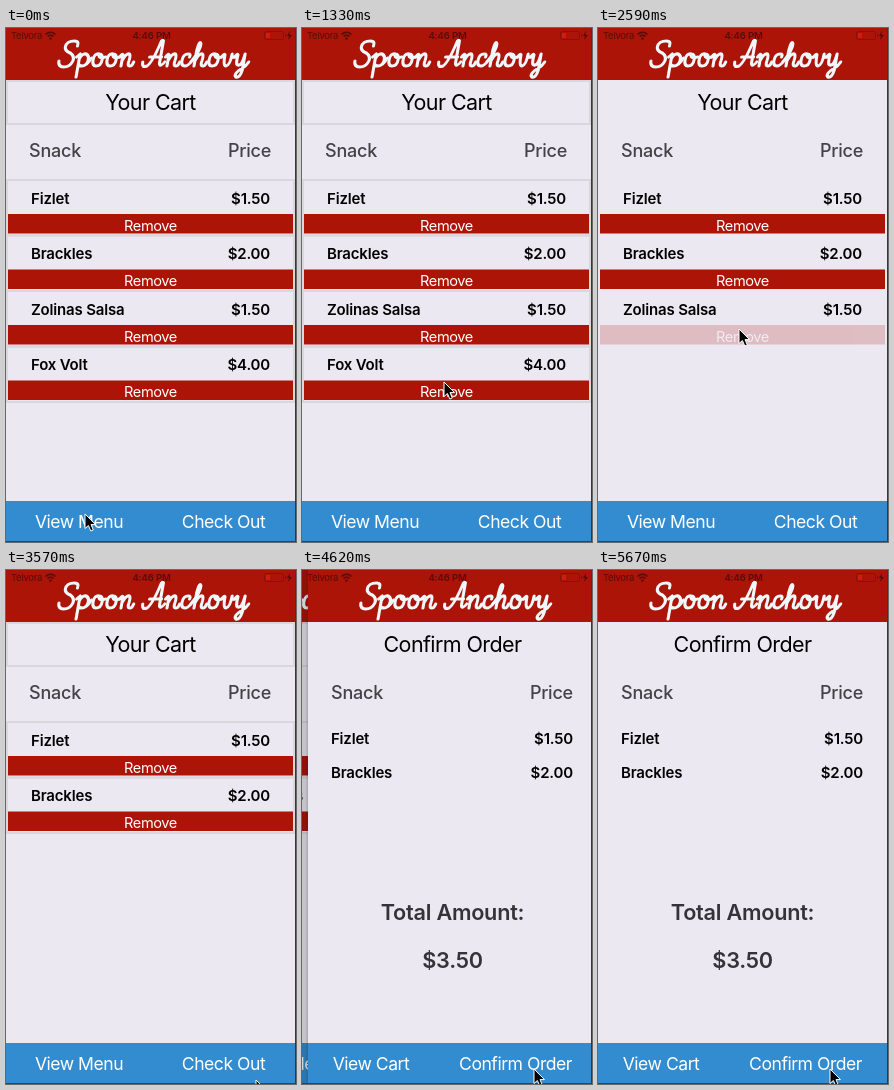
An HTML page for the animation above (5740 ms loop, 290 px wide and 514 px high).

```html
<!DOCTYPE html>
<html lang="en">
<head>
<meta charset="utf-8">
<title>Cart checkout</title>
<style>
  html, body { margin: 0; width: 100%; height: 100%; overflow: hidden; background: #ebe8f1; }
  svg { display: block; width: 290px; height: 514px; }
  text { font-family: Inter, "Open Sans", sans-serif; letter-spacing: -.028em; white-space: pre; }
  .semi { font-weight: 600; letter-spacing: -.012em; }
  .medium { font-weight: 500; letter-spacing: -.012em; }
  .line { fill: none; stroke: #d9d7dc; stroke-width: 2; }
  .script { fill: none; stroke: #f1f8fc; stroke-width: 3.1; stroke-linecap: round; stroke-linejoin: round; }
</style>
</head>
<body>
<svg id="stage" viewBox="0 0 290 514"></svg>
<script>
const LOOP = 5740, STEP = 70, WIDTH = 289;
const RED = '#ab1407', BLUE = '#338ccf', PAPER = '#ebe8f1';
const items = [['Fizlet', '$1.50'], ['Brackles', '$2.00'], ['Zolinas Salsa', '$1.50'], ['Fox Volt', '$4.00']];

// Brush lettering: advance width and pen path on a zero baseline
const glyphs = {
  S: [17, 'M16-20Q17-25 12-25Q4-25 4-19Q4-15 10-13Q15-10 14-5Q12 1 6 1Q0 1 0-5'],
  A: [21, 'M-1-4Q-1 2 4 0Q9-4 14-25Q15-26 16-25V-3Q17 2 21-4M5-9H17'],
  p: [15, 'M0-9L3-12V11M3-7Q5-13 9-12Q13-10 12-5Q11 0 7 0Q4 0 3-2M7 0Q12 0 15-8'],
  o: [14, 'M7-12Q2-13 2-6Q2 0 6 0Q11 0 11-6Q11-12 7-12Q7-7 14-9'],
  n: [15, 'M0-9Q2-13 3-11V0M3-5Q6-13 9-12Q11-11 10-5Q9 0 12 0Q14 0 15-4'],
  c: [12, 'M9-9Q10-12 7-12Q2-12 2-5Q2 0 6 0Q9 0 12-5'],
  h: [15, 'M-1-4Q7-16 6-22Q4-27 3-15V0M3-5Q6-13 9-12Q11-11 10-5Q9 0 12 0Q14 0 15-4'],
  v: [13, 'M0-9Q2-13 3-11Q3 0 6 0Q10-1 10-12Q10-8 13-9'],
  y: [14, 'M0-9Q2-13 3-11Q2-1 5-1Q9 0 10-12V4Q9 12 5 11Q1 8 10 2Q13 0 15-4'],
  ' ': [10, '']
};

const rect = (x, y, w, h, fill, extra = '') =>
  `<rect x="${x}" y="${y}" width="${w}" height="${h}" fill="${fill}" ${extra}/>`;
const box = (y, h) => `<rect class="line" x="1" y="${y + 1}" width="287" height="${h}"/>`;
const text = (x, y, str, size, anchor = 'start', fill = '#000', cls = '') =>
  `<text x="${x}" y="${y}" font-size="${size}" text-anchor="${anchor}" fill="${fill}" class="${cls}">${str}</text>`;

function lettering(str, x, y) {
  let pen = 0;
  const strokes = [...str].map(ch => {
    const [advance, d] = glyphs[ch];
    const path = `<path d="${d}" transform="translate(${pen})"/>`;
    pen += advance;
    return path;
  }).join('');
  return `<g class="script" role="img" aria-label="${str}" transform="translate(${x} ${y}) skewX(-10)">${strokes}</g>`;
}

function screen(title, left, leftX, right, rightX, body) {
  return rect(0, 0, WIDTH, 514, PAPER) +
    `<g class="borders">${box(52, 43)}</g>` +
    rect(0, 0, WIDTH, 52, RED) + lettering('Spoon Anchovy', 52, 38) +
    text(144.5, 82, title, 21.5, 'middle') +
    text(23, 128.5, 'Snack', 18, 'start', '#434246', 'medium') +
    text(265, 128.5, 'Price', 18, 'end', '#434246', 'medium') + body +
    rect(0, 473, WIDTH, 41, BLUE) +
    text(leftX, 499.5, left, 17.6, 'middle', '#fff') +
    text(rightX, 499.5, right, 17.6, 'middle', '#fff');
}

const row = ([name, price], i) => `<g class="row" transform="translate(0 ${151 + i * 55.5})">
  <g class="borders">${box(0, 55.5)}</g>
  ${text(25, 24.5, name, 15, 'start', '#000', 'semi')}${text(264, 24.5, price, 15, 'end', '#000', 'semi')}
  <g class="remove">${rect(2, 35, 285, 19.5, RED)}${text(144.5, 51.5, 'Remove', 14.6, 'middle', '#fff')}</g></g>`;

const cartBody = items.map(row).join('');
const orderBody = items.slice(0, 2).map(([name, price], i) =>
  text(23, 174 + i * 33.5, name, 15, 'start', '#000', 'semi') +
  text(265, 174 + i * 33.5, price, 15, 'end', '#000', 'semi')).join('') +
  text(144.5, 350, 'Total Amount:', 21.7, 'middle', '#343338', 'semi') +
  text(144.5, 398, '$3.50', 21.7, 'middle', '#343338', 'semi');

const statusBar = text(5, 11, 'Telvora', 9.5, 'start', '#560d08') +
  `<g fill="none" stroke="#560d08" stroke-width="1.6"><path d="M39.5 6.5Q44.500 2 49.500 6.500M41.500 8.500Q44.500 6 47.500 8.500"/>
   <circle cx="44.500" cy="10.500" r=".5"/></g>` +
  text(145.5, 11, '4:46 PM', 9.5, 'middle', '#560d08', 'semi') +
  `<rect x="258.500" y="3.500" width="19" height="8" rx="2" fill="none" stroke="#7c160f"/>` +
  rect(260, 5, 4, 5, '#d8190d') + rect(279, 6, 1.2, 3, '#7c160f') +
  `<path d="M284 3L281 8H283L282 12L286 7H283.500Z" fill="#560d08"/>`;

const stage = document.getElementById('stage');
stage.innerHTML = `
  <g id="cart">${screen('Your Cart', 'View Menu', 73, 'Check Out', 217.5, cartBody)}</g>
  ${rect(0, 0, WIDTH, 514, '#000', 'id="shade"')}
  <g id="order">${rect(-1.5, 0, 1.5, 514, '#000', 'opacity=".12"')}
    ${screen('Confirm Order', 'View Cart', 63, 'Confirm Order', 207.5, orderBody)}</g>
  ${statusBar}
  ${rect(289, 0, 1, 514, '#38363b')}${rect(0, 513, 290, 1, '#38434c')}
  <path id="cursor" d="M0 0V14.500L3.400 11.500L5.800 17L8.300 16L6 10.600H10.500Z" fill="#000" stroke="#fff" stroke-width="1"/>`;

const $ = id => document.getElementById(id);
const rows = [...stage.querySelectorAll('.row')];
const cartLines = $('cart').querySelectorAll('.borders');
const orderLines = $('order').querySelectorAll('.borders');
const clamp = v => Math.max(0, Math.min(1, v));

// Cursor stops: time, x, y
const stops = [[0, 79, 486], [300, 79, 486], [1150, 142, 354], [1700, 142, 354], [2250, 141, 301],
  [2720, 141, 301], [3400, 250, 510], [3620, 250, 510], [4060, 232, 499], [LOOP, 232, 499]];
// Press and removal times by row
const presses = { 3: [1470, 1680], 2: [2440, 2660] };

function cursorAt(t) {
  const i = stops.findIndex(s => s[0] > t);
  const [t0, x0, y0] = stops[i - 1], [t1, x1, y1] = stops[i];
  const u = (t - t0) / (t1 - t0), e = u * u * (3 - 2 * u);
  return [x0 + (x1 - x0) * e, y0 + (y1 - y0) * e];
}

const show = (nodes, on) => nodes.forEach(n => n.setAttribute('visibility', on ? 'visible' : 'hidden'));

function draw(t) {
  let pressing = false;
  for (const [i, [down, gone]] of Object.entries(presses)) {
    rows[i].setAttribute('display', t < gone ? 'inline' : 'none');
    rows[i].querySelector('.remove').setAttribute('opacity', 1 - .8 * clamp((t - down) / 150));
    pressing ||= t > down && t < gone;
  }
  const left = (1 - clamp((t - 4261) / 578)) ** 4;
  $('order').setAttribute('transform', `translate(${left * 290})`);
  $('order').setAttribute('display', left < 1 ? 'inline' : 'none');
  $('cart').setAttribute('transform', `translate(${(left - 1) * 87})`);
  $('shade').setAttribute('opacity', (1 - left) * .165);
  show(cartLines, !pressing);
  show(orderLines, left > .05);
  $('cursor').setAttribute('transform', `translate(${cursorAt(t)})`);
}

function tick() {
  const t = performance.now() % LOOP;
  draw(Math.floor(t / STEP) * STEP);
  requestAnimationFrame(tick);
}
tick();
</script>
</body>
</html>
```
